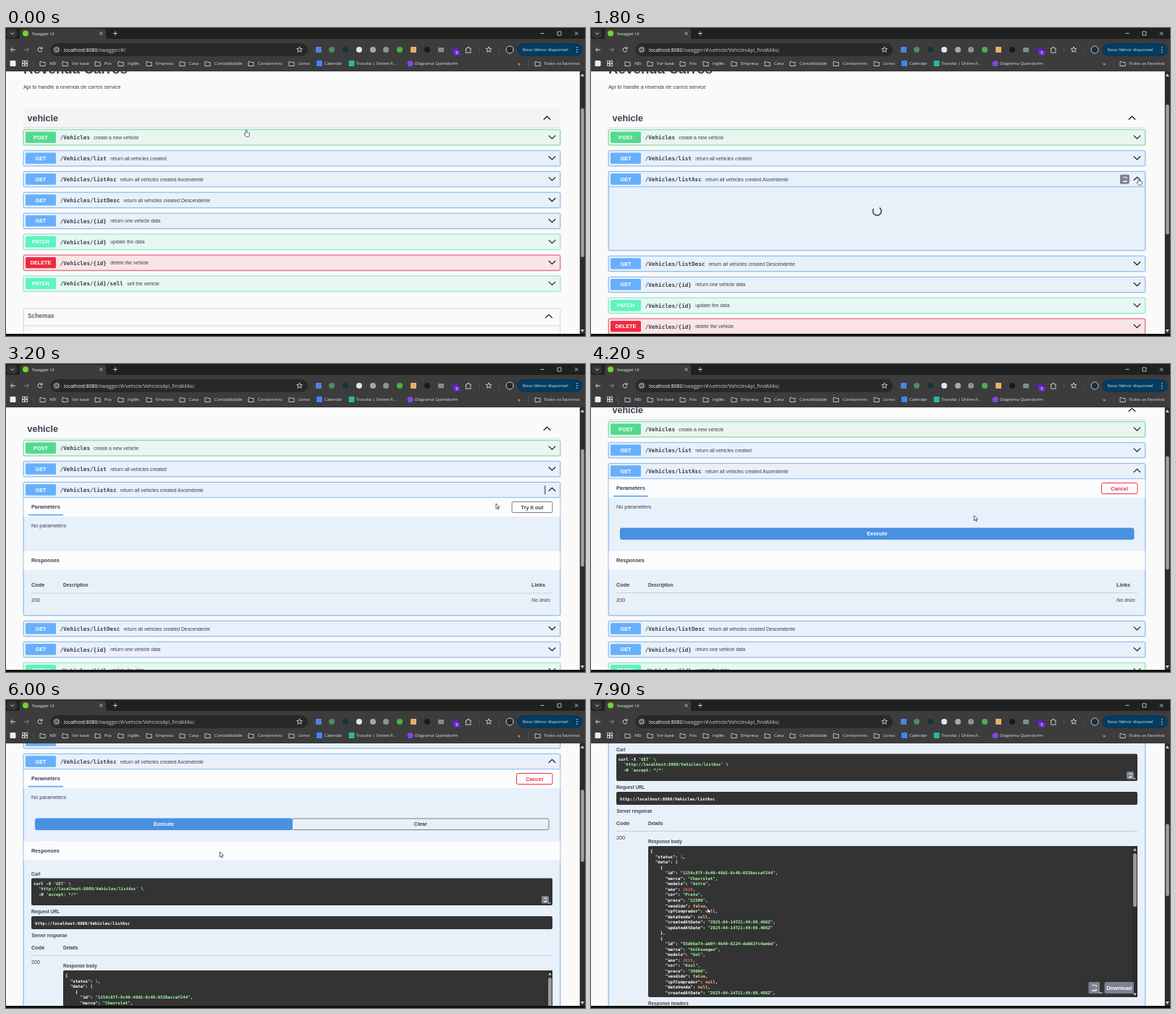
These frames come from a looping animation (800 px wide and 426 px high, 8000 ms). An HTML page:

```html
<!DOCTYPE html>
<html lang="pt">
<head>
<meta charset="utf-8">
<title>Swagger UI</title>
<style>
html, body { margin: 0; width: 100%; height: 100%; overflow: hidden; background: #fafafa; }
svg { display: block; width: 100%; height: 100%; }
text { font-family: "Liberation Sans", Arial, sans-serif; white-space: pre; }
.b { font-weight: bold; }
.i { font-style: italic; }
.m { font-family: "DejaVu Sans Mono", monospace; font-weight: bold; }
.u { font-family: "Open Sans", "Noto Sans", sans-serif; }
.c { text-anchor: middle; }
</style>
</head>
<body>
<svg id="stage" viewBox="0 0 800 426"></svg>
<script>
const LOOP = 8000, STEP = 100;
const LOADING = 1700, LOADED = 2000, TRY = 3700, RUN = 4960;
const INK = '#3b4151', BLUE = '#67b0fc', DARK = '#333', BUTTON = '#7d8293';
const COLORS = { POST: '#53da90', GET: BLUE, PATCH: '#5ff3c0', DELETE: '#ee2b41' };
const FILLS = { POST: '#e8f6ef', GET: '#e8f0f9', PATCH: '#e7f7f2', DELETE: '#f9e4e6' };
const ROWS = [
  ['POST', '', 'create a new vehicle'],
  ['GET', '/list', 'return all vehicles created'],
  ['GET', '/listAsc', 'return all vehicles created Ascendente'],
  ['GET', '/listDesc', 'return all vehicles created Descendente'],
  ['GET', '/{id}', 'return one vehicle data'],
  ['PATCH', '/{id}', 'update the data'],
  ['DELETE', '/{id}', 'delete the vehicle'],
  ['PATCH', '/{id}/sell', 'sell the vehicle']
];
const DATE = '2025-04-14T21:49:09.408Z';
const car = (id, marca, modelo, ano, cor, preco) => ({
  id, marca, modelo, ano, cor, preco, vendido: false, cpfComprador: null,
  dataVenda: null, createdAtDate: DATE, updatedAtDate: DATE
});
const BODY = JSON.stringify({ status: 1, data: [
  car('1154c87f-8c40-48d2-8c48-6526eccaf244', 'Chevrolet', 'Astra', 2020, 'Preto', '22500'),
  car('55d66e74-ab9f-4b49-8224-da692fc4aebd', 'Volkswagen', 'Gol', 2019, 'Azul', '30000')
] }, null, 2).split('\n').slice(0, 27);
const API = 'http://localhost:8080/Vehicles/listAsc';
const CURL = ["curl -X 'GET' \\", `  '${API}' \\`, "  -H 'accept: */*'"];

// time, then values; eased between neighbours
const SCROLL = [[0, 0], [2850, 0], [3150, 35], [4000, 35], [4300, 70], [5350, 70],
  [5650, 124], [6050, 124], [6400, 244], [6700, 244], [7000, 296]];
const POINTER = [[0, 332, 141], [900, 600, 180], [1500, 757, 208], [2800, 757, 208],
  [3200, 677, 193], [3600, 727, 195], [3800, 727, 195], [4500, 401, 219], [5300, 401, 219],
  [6000, 295.5, 210], [6500, 281.5, 201], [6900, 281.5, 201], [7700, 161, 288]];

const ramp = (t, a, b) => Math.min(1, Math.max(0, (t - a) / (b - a)));
function at(keys, t) {
  const n = keys.findIndex(k => k[0] > t);
  if (n < 0) return keys[keys.length - 1].slice(1);
  const [a, b] = [keys[n - 1], keys[n]], p = ramp(t, a[0], b[0]), e = p * p * (3 - 2 * p);
  return a.slice(1).map((v, i) => v + (b[i + 1] - v) * e);
}

const rect = (x, y, w, h, fill, r = 0, stroke = 'none', sw = 1) =>
  `<rect x="${x}" y="${y}" width="${w}" height="${h}" rx="${r}" fill="${fill}" stroke="${stroke}" stroke-width="${sw}"/>`;
const circle = (x, y, r, fill, stroke = 'none') =>
  `<circle cx="${x}" cy="${y}" r="${r}" fill="${fill}" stroke="${stroke}"/>`;
const line = (d, stroke = '#ddd', sw = 1, fill = 'none') =>
  `<path d="${d}" fill="${fill}" stroke="${stroke}" stroke-width="${sw}"/>`;
const text = (x, y, s, size = 7.3, cls = '', fill = INK) =>
  `<text x="${x}" y="${y}" font-size="${size}" class="${cls}" fill="${fill}">${s}</text>`;
const bold = (x, y, s, size = 7.3, fill) => text(x, y, s, size, 'b', fill);
const ui = (x, y, s, size = 5.9, fill = '#e3e3e3') => text(x, y, s, size, 'u', fill);
const rule = y => rect(35, y, 720, .6, '#b4bac4');
const chevron = (x, y, up) => {
  const k = up ? -1 : 1;
  return line(`M${x - 4.7} ${y - 2.2 * k}l4.7 ${4.5 * k}l4.7 ${-4.5 * k}`, '#1c1c1c', 1.2);
};
const button = (x, y, w, h, label, color, fill = 'none', edge = color) =>
  rect(x, y, w, h, fill, 2, edge) + text(x + w / 2, y + h / 2 + 2.6, label, 7.3, 'b c', color);
const copyButton = (x, y, w, h) => rect(x, y, w, h, BUTTON, 1.5) + (w < 8 ? '' :
  line(`M${x + w * .3} ${y + h * .28}h${w * .4}v${h * .18}m0 ${h * .2}v${h * .1}h${-w * .4}z` +
    `m${w * .2} ${h * .28}h${w * .35}`, '#fff', .9));

function highlight(s) {
  const span = (c, v) => `<tspan fill="${c}">${v}</tspan>`;
  return s.replace(/('[^']*'|"[^"]*")(:?)|(null|false)|(\b\d+\b)/g, (m, str, colon, word, num) =>
    colon ? m : str ? span('#a2fca2', str) : word ? span('#fcc28c', word) : span('#d36363', num));
}
const code = (x, y, lines) =>
  lines.map((s, i) => text(x, y + i * 7.52, highlight(s), 5.74, 'm', '#fff')).join('');

function responseTable(y) {
  return bold(35, y + 343, 'Code') + bold(79, y + 343, 'Description', 6.28) + bold(726, y + 343, 'Links') +
    rule(y + 351.7) + text(35, y + 364, '200') + text(726, y + 364, 'No links', 7.3, 'i');
}

function result(y) {
  return bold(35, y + 366.5, 'Curl', 6.28) + rect(35, y + 370.5, 720, 37.5, DARK, 2) +
    code(38, y + 379.7, CURL) + copyButton(740, y + 395, 10, 10.5) +
    bold(35, y + 419.3, 'Request URL', 6.28) + rect(35, y + 423, 720, 18, DARK, 2) +
    text(40, y + 434.5, API, 5.74, 'm', '#fff') +
    bold(35.5, y + 452.3, 'Server response', 6.28) +
    bold(35, y + 469.2, 'Code') + bold(79, y + 469, 'Details', 6.28) + rule(y + 477) +
    text(35, y + 489.4, '200') + bold(79, y + 494.2, 'Response body', 6.28) +
    rect(79, y + 498, 676, 209, DARK, 2) + code(82, y + 507.3, BODY) +
    rect(747.5, y + 498, 7.5, 209, '#2c2c2c') + rect(749, y + 508, 5, 74, '#9a9a9a', 2.5) +
    line(`M749 ${y + 504.5}l2.4-3.6l2.4 3.6zM749 ${y + 701.5}l2.4 3.6l2.4-3.6z`, 'none', 0, '#c8c8c8') +
    copyButton(687.5, y + 686, 15.5, 16) + button(709.5, y + 686, 40.5, 16, 'Download', '#fff', BUTTON, 'none') +
    bold(79, y + 718.3, 'Response headers', 6.28);
}

function details(t) {
  if (t < LOADED) {
    return `<g transform="translate(395.3 253.3) rotate(${-55 + (t - 1800) * .36})">` +
      line('M5.8 0A5.8 5.8 0 1 1 0 -5.8', '#555', 1.8) + '</g>';
  }
  const tried = t >= TRY, ran = t >= RUN, grow = ramp(t, RUN, RUN + 300);
  const extra = ran ? 4 * (1 - grow) : 0, shift = (tried ? 25.5 : 0) + extra;
  let s = rect(24.5, 219.7, 741, 26.3, '#fbfcfe') + bold(35, 235, 'Parameters') +
    rect(31, 242.7, 48, 2, BLUE) + text(35, 260.5, 'No parameters') +
    (tried ? button(705.5, 225.5, 49.5, 15, 'Cancel', '#f0323c')
           : button(699, 225.5, 56, 15, 'Try it out', INK, 'none', '#808080'));
  if (tried) {
    const w = ran ? 70 + 285.5 * grow : 710, y = 288 + extra * .25, h = 15.5 + extra * .7;
    if (ran) s += button(40 + w, y, 710 - w, h, 'Clear', INK, 'none', '#7d7d7d');
    s += button(40.5, y, w - .5, h, 'Execute', '#fff', '#4990e2', '#4990e2');
  }
  return s + rect(24.5, 294 + shift, 741, 26, '#fbfcfe') + bold(35, 309 + shift, 'Responses') +
    (ran ? result(extra) : responseTable(shift));
}

function page(t, open, scroll) {
  let s = bold(24, 62.5, 'Revenda Carros', 18.8) +
    text(24, 84, 'Api to handle a revenda de carros service') +
    (t < 200 ? rect(24, 111, 742, 27, '#f4f4f4') : '') +
    bold(29.5, 129.2, 'vehicle', 12.55) + rect(24, 137.7, 742, .7, '#c8cad0') + chevron(747.5, 124.5, true);
  ROWS.forEach(([method, tail, note], i) => {
    const c = 151.3 + 28.9 * i + (i > 2 ? open : 0), path = '/Vehicles' + tail, active = i === 2 && open;
    const h = 21.2 + (active ? open : 0);
    s += rect(24, c - 10.4, 742, h, 'none', 2, 'rgba(0,0,0,.07)', 2.4) +
      rect(24.3, c - 10.6, 741.4, h, FILLS[method], 2, COLORS[method], .8) +
      rect(27, c - 7.8, 42, 15.4, COLORS[method], 1.6) +
      text(48, c + 2.5, method, 7.3, 'b c', '#fff') + text(74.7, c + 2.8, path, 7.63, 'm') +
      text(80 + path.length * 4.59, c + 2.5, note, 6.8) + chevron(754.5, c - .5, active);
    if (active) s += details(t) + rect(24, 219.3, 742, .8, BLUE);
  });
  const w = 13 * ramp(t, 1400, 1600) * (1 - ramp(t, 2860, 3260));
  if (w > 0) s += copyButton(744 - w + (t > 2860 ? 2 * (1 - w / 13) : 0), 202.7, w, 13);
  const y = 388 + open;
  s += rect(24.3, y, 741.4, 120, 'none', 2, '#c5c8ce', .8) + bold(30, y + 13.4, 'Schemas', 8.37, '#606060') +
    chevron(750, y + 10.8, true) + rect(24, y + 23.6, 742, .7, '#c5c8ce');
  return `<g transform="translate(0 ${-scroll})">${s}</g>`;
}

function scrollbar(open, scroll) {
  const k = 343 / (604 + open);
  return rect(792.8, 60, 7.2, 363, '#2c2c2c') + rect(794.2, 70 + k * (scroll + 72), 4.6, k * 363, '#9f9f9f', 2.3) +
    line('M793.8 67l2.6-4l2.6 4zM793.8 417l2.6 4l2.6-4z', 'none', 0, '#d0d0d0');
}

const folder = (x, label, gap = 13) =>
  line(`M${x} 46.5h2.6l1 1h3.6v5h-7.2z`, '#d0d0d0', .9) + ui(x + gap, 51.3, label);
const star = (x, y, r) => {
  const p = [...Array(10)].map((_, i) => {
    const a = Math.PI * (i / 5 - .5), q = i % 2 ? r * .45 : r;
    return (x + q * Math.cos(a)).toFixed(2) + ' ' + (y + q * Math.sin(a)).toFixed(2);
  });
  return line(`M${p.join('L')}z`, '#ddd', .9);
};

const FOLDERS = [[47, 'ABI'], [78, 'Vor base'], [123, 'Pos'], [155, 'Inglês'], [194, 'Empresa'],
  [240, 'Casa'], [275, 'Contabilidade'], [335, 'Condominio'], [391, 'Livros']];
const DOTS = [[450, '#4f8a5c'], [469, '#17343b'], [488, '#dfe5ea'], [507, '#a8a8a8'], [525, '#8d938f'],
  [544, '#4caf50'], [582, '#191919'], [620, '#5a23b8']];

const browser =
  rect(0, 0, 800, 16, '#1f2020') + rect(0, 15, 800, 45, '#3c3c3c') +
  rect(1, 1.5, 14, 12.5, '#333', 4) + line('M6.3 6.5l2.4 2.3l2.4-2.3', '#ddd') +
  line('M15 16q4 0 4-4v-7q0-4 4-4h111q4 0 4 4v7q0 4 4 4z', 'none', 0, '#3c3c3c') +
  circle(27, 7.5, 4, '#6fd535') + ui(36, 9.7, 'Swagger UI') +
  line('M129.3 5.3l4.4 4.4m0-4.4l-4.4 4.4M148 7.5h6m-3-3v6', '#ddd', .9) +
  line('M738.5 7.5h5M762 5h5v5h-5zM785.7 5l5 5m0-5l-5 5', '#ddd', .8) +
  line('M13 30h-6.5m3-3l-3 3l3 3', '#ddd') + line('M25 30h6.5m-3-3l3 3l-3 3', '#858585') +
  line('M49.6 28.4a3 3 0 1 0 .3 2.4M50 26v2.7h-2.7', '#ddd') +
  rect(61.5, 21, 355.5, 18, '#282828', 9) + circle(70, 30, 5.8, '#3c3c3c') +
  circle(70, 30, 3, 'none', '#d0d0d0') + line('M70 29.5v2M70 28v.7', '#d0d0d0', .8) + star(405.5, 30, 4) +
  rect(428, 26, 8, 8, '#4a86e0', 1) + DOTS.map(([x, c]) => circle(x, 30, 4, c)).join('') +
  rect(559, 26, 8, 8, '#e8b06a', 1) + rect(597, 27, 8, 6.5, '#858b87', 1) +
  rect(619, 31, 8, 6.5, '#7a2be0', 1.5) + text(623, 36, '5', 5, 'c', '#fff') +
  line('M635.5 28h2v-1.2q1.3-1.4 2.4 0v1.2h2.2v2.2q-1.6 1 0 2v2h-6.6z', '#ddd', .9) +
  rect(653, 25, .7, 10, '#5b5b5b') + star(667, 30, 4) + rect(681, 25, .7, 10, '#5b5b5b') +
  circle(696, 30, 5, '#22282c', '#c5ced3') +
  rect(706, 21, 91, 18, '#073a5e', 9) + ui(713.5, 32.2, 'Novo Velnor disponível', 5.9, '#d5ecff') +
  [26.8, 30, 33.2].map(y => circle(789, y, .8, '#d5ecff')).join('') +
  rect(5.5, 45, 8, 8, '#ececec', 1.5) +
  [22.5, 26.7].map(x => [45.3, 49.5].map(y => rect(x, y, 3, 3, 'none', 0, '#d0d0d0', .9)).join('')).join('') +
  rect(37.5, 44, .7, 10, '#5b5b5b') + FOLDERS.map(f => folder(...f)).join('') +
  rect(429, 45, 8, 8, '#4285f4', 1) + ui(440, 51.3, 'Calendar') +
  rect(473.5, 45, 8, 8, '#2bb5a0', 1) + ui(484, 51.3, 'Tracolia | Online P...') +
  circle(558.5, 49.2, 4, '#8247e5') + ui(565, 51.3, 'Diagrama Quendorim') +
  ui(707, 51.5, '»', 8) + rect(721.5, 44, .7, 10, '#5b5b5b') + folder(731, 'Todos os favoritos', 12) +
  rect(0, 423, 800, 3, '#0e120f');

function pointer(t) {
  const [x, y] = at(POINTER, t);
  const hand = t < 2850 || (t >= 3500 && t < 3900) || (t >= 4400 && t < 5300);
  const d = hand
    ? 'M-.8.4q.8-1.2 1.7 0v3.2l2.7.7q1.1.3.9 1.4l-.6 2.8q-.2.9-1 .9h-2.8l-3.1-3.3q.6-1 1.7-.3z'
    : 'M0 0v7.2l1.7-1.6l1.2 2.6l1.1-.5l-1.2-2.5h2.3z';
  return `<g transform="translate(${x} ${y})">${line(d, '#222', .7, '#fff')}</g>`;
}

function draw(t) {
  const scroll = at(SCROLL, t)[0];
  const open = t < LOADING ? 0 : t < LOADED ? 88 : t < TRY ? 163 : t < RUN ? 189 : 641;
  const hash = '/swagger/#/' + (t < LOADING ? '' : 'vehicle/VehiclesApi_findAllAsc');
  const address = 'localhost:8080<tspan fill="#c7c7c7">' + hash + '</tspan>';
  return rect(0, 0, 800, 426, '#fafafa') + page(t, open, scroll) + scrollbar(open, scroll) +
    browser + ui(80, 32.6, address, 6.9, '#fff') + pointer(t);
}

const stage = document.getElementById('stage');
let shown = -1;
function tick() {
  const t = Math.floor(performance.now() % LOOP / STEP) * STEP;
  if (t !== shown) stage.innerHTML = draw(shown = t);
  requestAnimationFrame(tick);
}
tick();
</script>
</body>
</html>
```
